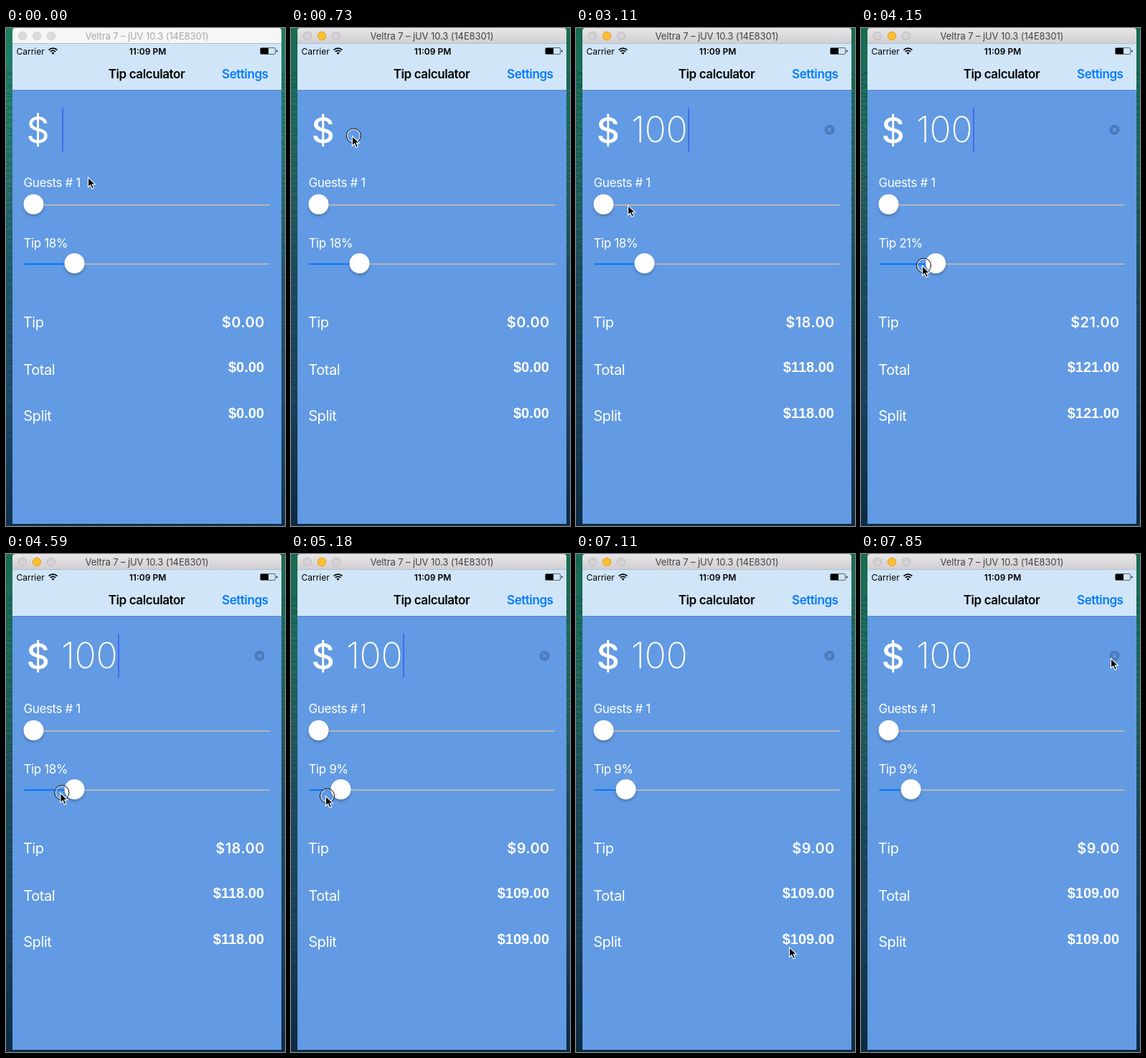
Recreate the animation shown at these times as an HTML page. Size 389x692 px, loop 8000 ms.

```html
<!DOCTYPE html>
<html lang="en">
<head>
<meta charset="utf-8">
<title>Tip calculator</title>
<style>
  html, body { margin: 0; width: 100%; height: 100%; overflow: hidden; background: #123a5c; }
  svg { display: block; width: 389px; height: 692px; font-family: Inter, Roboto, sans-serif; }
  text { white-space: pre; }
  .bar { font-size: 13px; letter-spacing: -.1px; text-anchor: middle; }
  .status { font-size: 12px; }
  .nav { font-size: 17px; font-weight: 600; letter-spacing: -.41px; }
  .field { font-size: 17px; letter-spacing: -.41px; fill: #fff; }
  .row { font-size: 20px; letter-spacing: -.4px; fill: #fff; }
  .sum { font-size: 20px; font-weight: 700; text-anchor: end; fill: #fff; font-family: "Liberation Sans", Arial, sans-serif; }
  .tip { font-weight: 600; letter-spacing: .4px; font-family: Inter, Roboto, sans-serif; }
  .big { font-size: 50px; fill: #fff; }
  #bill { font-weight: 200; letter-spacing: -.4px; }
</style>
</head>
<body>
<svg viewBox="0 0 389 692">
  <defs>
    <linearGradient id="desk" x2="0" y2="1">
      <stop offset="0" stop-color="#1c7d5f"/>
      <stop offset=".16" stop-color="#23806d"/>
      <stop offset=".32" stop-color="#2a7270"/>
      <stop offset=".5" stop-color="#215a6c"/>
      <stop offset=".75" stop-color="#204e6d"/>
      <stop offset="1" stop-color="#10324f"/>
    </linearGradient>
    <linearGradient id="chrome" x2="0" y2="1">
      <stop offset="0" stop-color="#e8e6e8"/>
      <stop offset="1" stop-color="#d0ced0"/>
    </linearGradient>
    <filter id="soft" x="-50%" y="-50%" width="200%" height="200%">
      <feGaussianBlur stdDeviation="2"/>
    </filter>
    <g id="thumb">
      <circle cy="2.5" r="13.5" fill="#000" opacity=".28" filter="url(#soft)"/>
      <circle r="14" fill="#fff"/>
    </g>
  </defs>

  <rect width="389" height="692" fill="url(#desk)"/>
  <path id="waves" fill="none" stroke="#0b2b40" stroke-width="1.5" opacity=".3"/>
  <rect id="shade" width="389" height="692" opacity=".14"/>

  <path id="top" d="M9 22V4q0-4 4-4h367q4 0 4 4v18z"/>
  <g id="lamps">
    <circle cx="23" cy="11" r="5.7"/>
    <circle cx="43" cy="11" r="5.7"/>
    <circle cx="63" cy="11" r="5.7"/>
  </g>
  <text id="name" class="bar" x="196.5" y="15.7">Veltra 7 – jUV 10.3 (14E8301)</text>

  <rect x="9" y="21" width="375" height="668" fill="#629ae3"/>
  <rect x="9" y="21" width="375" height="65" fill="#d0e5f8"/>
  <rect x="9" y="21" width="375" height="1" fill="#b5bec8"/>
  <rect x="9" y="86" width="375" height="1" fill="#5383c1"/>

  <text class="status" x="14.5" y="36.7">Carrier</text>
  <g fill="none" stroke="#000" stroke-width="1.7">
    <path d="M59.6 30.7a8.2 8.2 0 0 1 11.8 0M61.7 33a5.3 5.3 0 0 1 7.6 0"/>
    <path d="M65.5 36.8l-2-2.1a2.9 2.9 0 0 1 4 0z" fill="#000" stroke="none"/>
  </g>
  <text class="status" x="197.5" y="36.7" font-weight="600" text-anchor="middle">11:09 PM</text>
  <rect x="354.5" y="27.5" width="21" height="9" rx="1.5" fill="none" stroke="#444" stroke-width=".8"/>
  <rect x="355" y="28" width="11" height="8"/>
  <path d="M377 30.5q1.5 0 1.5 1.5t-1.5 1.5z"/>

  <text class="nav" x="196" y="70" text-anchor="middle">Tip calculator</text>
  <text class="nav" x="301" y="70" fill="#007aff">Settings</text>

  <text id="dollar" class="big" x="28.5" y="159.5">$</text>
  <text id="bill" class="big" x="77" y="159"></text>
  <rect id="caret" y="111" width="2" height="61" fill="#426bee"/>
  <g id="clear">
    <circle cx="353.5" cy="141.5" r="7" fill="#4a7abd"/>
    <path d="M350.8 138.8l5.4 5.4m0-5.4l-5.4 5.4" stroke="#6b9fe4" stroke-width="1.3"/>
  </g>

  <text class="field" x="24.5" y="220.7">Guests # 1</text>
  <rect x="25" y="245" width="343" height="2" rx="1" fill="#b4b5b8"/>
  <use href="#thumb" x="38.5" y="245"/>

  <text id="rate" class="field" x="24.5" y="304.7"></text>
  <rect x="25" y="327" width="343" height="2" rx="1" fill="#b4b5b8"/>
  <rect id="fill" x="25" y="327" height="2" rx="1" fill="#007aff"/>
  <use id="knob" href="#thumb" y="327"/>

  <text class="row" x="23.7" y="416">Tip</text>
  <text class="row" x="24.2" y="482">Total</text>
  <text class="row" x="24.2" y="546">Split</text>
  <text id="tip" class="sum tip" x="360.7" y="416"></text>
  <text id="total" class="sum" x="360" y="478"></text>
  <text id="split" class="sum" x="360" y="542"></text>

  <g id="pointer">
    <g id="ring" fill="none">
      <circle cx="3.5" cy="1" r="9" stroke="#fff" stroke-width="1.2"/>
      <circle cx="3.5" cy="1" r="10" stroke="#000"/>
    </g>
    <path d="M1.5 1.5V15l3.2-2.9 2.3 5.3 2.5-1.1-2.3-5.1h4.1z" stroke="#fff" stroke-width="1.1"/>
  </g>
</svg>
<script>
  const LOOP = 8000;
  const TICK = 148.1;
  const CLICK = 4, TYPE = 12, GRAB = 25, DROP = 38;   // moments, in ticks

  // Pointer gestures; it rests between them
  const home = { x: 113, y: 206 };
  const moves = [
    { from: 0, to: 5, x: 80.5, y: 142 },
    { from: 19, to: 21, x: 71, y: 245 },
    { from: 21, to: 25, x: 75, y: 329 },
    { from: 27, to: 28, x: 84, y: 329 },
    { from: 29, to: 35, x: 47, y: 335 },
    { from: 40, to: 43, x: 281, y: 497 },
    { from: 44, to: 46, x: 296, y: 545 },
    { from: 48, to: 52, x: 343, y: 71 },
    { from: 52, to: 53, x: 347, y: 143.5 }
  ];

  const $ = id => document.getElementById(id);
  const set = (id, attrs) => {
    for (const key in attrs) $(id).setAttribute(key, attrs[key]);
  };
  const show = (id, on) => set(id, { visibility: on ? 'visible' : 'hidden' });
  const money = value => '$' + value.toFixed(2);
  const clamp = (v, lo, hi) => Math.min(hi, Math.max(lo, v));
  const mix = (a, b, p) => a + (b - a) * p;
  const ease = p => p * p * (3 - 2 * p);

  function pointerAt(tick) {
    let { x, y } = home;
    for (const m of moves) {
      const p = ease(clamp((tick - m.from) / (m.to - m.from), 0, 1));
      x = mix(x, m.x, p);
      y = mix(y, m.y, p);
    }
    return { x, y };
  }

  // The slider follows the pointer only while it is held
  function rateAt(tick) {
    const { x } = pointerAt(clamp(tick, GRAB, DROP));
    return Math.round(9 + (x - 47) * 12 / 37);
  }

  function caretOn(tick) {
    const typing = tick >= TYPE && tick < TYPE + 6;
    const phase = (tick + 10) % 7.5;
    return tick < DROP && (typing || phase < 4);
  }

  function drawWindow(active) {
    show('shade', active);
    set('top', { fill: active ? 'url(#chrome)' : '#f6f6f6' });
    set('name', { fill: active ? '#444' : '#a8a8a8' });
    set('lamps', { fill: active ? '#d4d2d4' : '#dcdcdc', stroke: active ? '#bcbabc' : '#cfcfcf' });
    const lamp = $('lamps').children[1];
    lamp.setAttribute('fill', active ? '#fdbe30' : '#dcdcdc');
    lamp.setAttribute('stroke', active ? '#dfa023' : '#cfcfcf');
    set('dollar', { 'font-weight': active ? 500 : 400 });
  }

  function drawForm(typed, rate) {
    const bill = Number(typed);
    const tip = bill * rate / 100;
    const knobX = 43.5 + 2.89 * rate;
    $('bill').textContent = typed;
    $('rate').textContent = `Tip ${rate}%`;
    $('tip').textContent = money(tip);
    $('total').textContent = $('split').textContent = money(bill + tip);
    set('fill', { width: knobX - 25 });
    set('knob', { x: knobX });
    show('clear', typed);
  }

  function draw(time) {
    const tick = Math.floor((time + 9) / TICK);
    const typed = '100'.slice(0, clamp(tick - TYPE + 1, 0, 3));
    const { x, y } = pointerAt(tick);
    drawWindow(tick >= CLICK);
    drawForm(typed, rateAt(tick));
    set('caret', { x: typed ? 67.5 + 29.5 * typed.length : 78 });
    show('caret', caretOn(tick));
    set('pointer', { transform: `translate(${x} ${y})` });
    show('ring', tick === CLICK || (tick >= GRAB && tick < DROP));
  }

  // Ripples on the desktop beside the window
  let ripples = '';
  for (let y = 60; y < 692; y += 6) {
    const dy = 3 * Math.sin(y * 1.7);
    ripples += `M0 ${y}l9 ${dy}M384 ${y + dy}l5 ${-dy}`;
  }
  set('waves', { d: ripples });

  const start = performance.now();
  function frame() {
    draw((performance.now() - start) % LOOP);
    requestAnimationFrame(frame);
  }
  frame();
</script>
</body>
</html>
```
